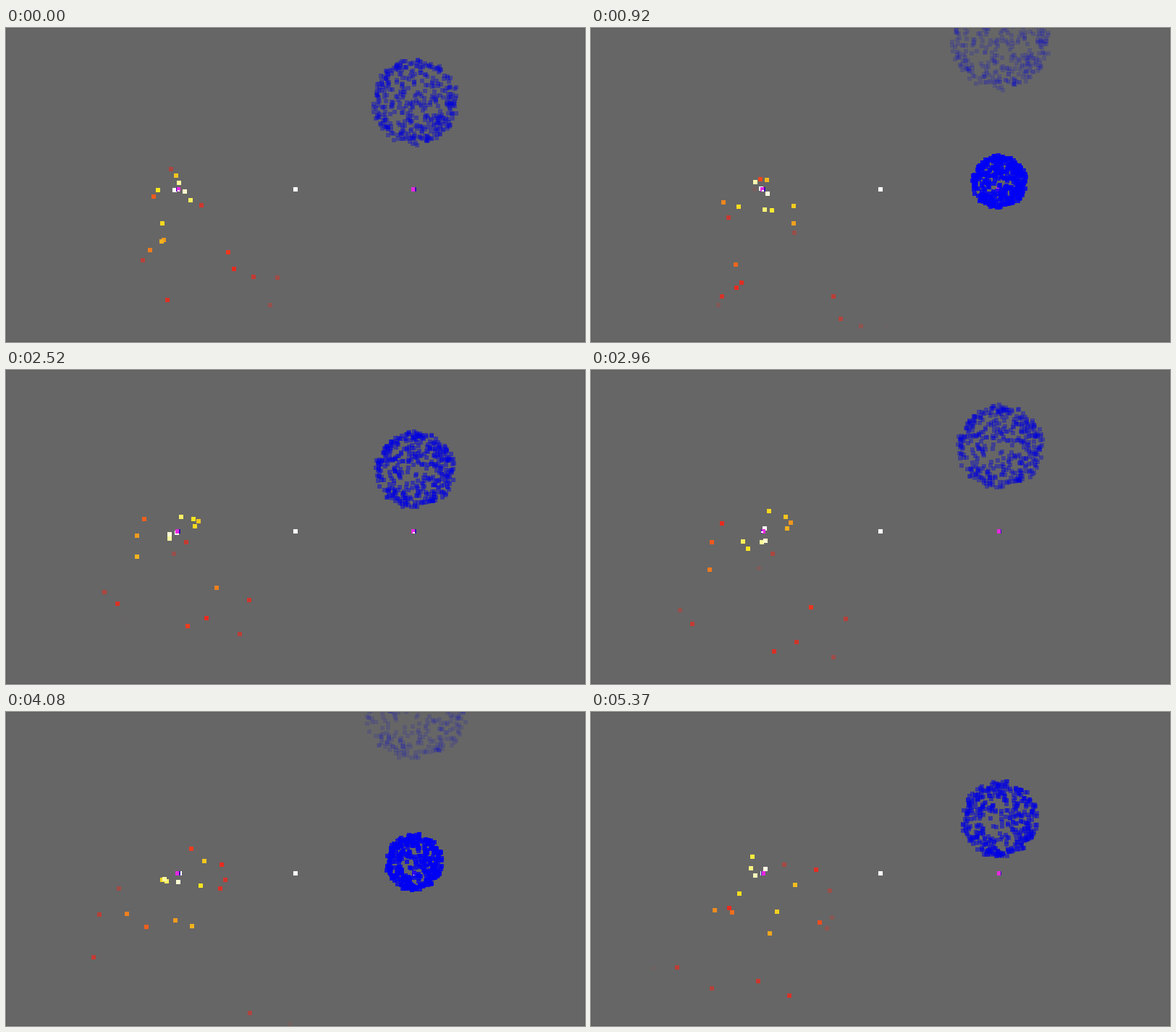
Recreate the animation shown at these times as an HTML page with a canvas. Size 800 by 434 pixels, loop 5.44 s.

```html
<!DOCTYPE html>
<html lang="en">
<head>
<meta charset="utf-8">
<title>Particle emitters</title>
<style>
  html, body { margin: 0; width: 100%; height: 100%; overflow: hidden; background: #666; }
  canvas { display: block; width: 800px; height: 434px; }
</style>
</head>
<body>
<canvas id="stage" width="800" height="434"></canvas>
<script>
const ctx = document.getElementById('stage').getContext('2d');
const LOOP = 5440, STEP = 47.26, LEAD = 10;
const SIZE = 6;

// Times in seconds, distances in pixels
const FIRE = { x: 236.5, y: 222.5, speed: 40, gravity: 18, life: 4.6, fade: 2.2, every: 0.195 };
const BALL = {
  x: 563.3, y: 222.7, drift: 0.7, lift: 14.05, radius: 28.6, growth: 10.9,
  life: 4.6, first: -2.93, every: 2.99, count: 400
};

function random(seed) {
  return () => {
    seed = (seed + 0x6D2B79F5) | 0;
    let n = Math.imul(seed ^ (seed >>> 15), 1 | seed);
    n = (n + Math.imul(n ^ (n >>> 7), 61 | n)) ^ n;
    return ((n ^ (n >>> 14)) >>> 0) / 4294967296;
  };
}

// A random direction on a unit sphere, seen from the front
function direction(rnd) {
  const z = rnd() * 2 - 1, turn = rnd() * Math.PI * 2;
  const r = Math.sqrt(1 - z * z);
  return [r * Math.cos(turn), r * Math.sin(turn)];
}

function makeBurst(i) {
  const rnd = random(11 + i * 7);
  const dots = Array.from({ length: BALL.count }, () => {
    const depth = 0.84 + rnd() * 0.16;
    return direction(rnd).map(v => v * depth);
  });
  return { birth: BALL.first + i * BALL.every, dots };
}

function makeSparks() {
  const rnd = random(29);
  const births = [];
  for (let t = -FIRE.life; t < LOOP / 1000; t += FIRE.every) births.push(t);
  return births.map(birth => {
    const [vx, vy] = direction(rnd).map(v => v * FIRE.speed);
    return { birth, vx, vy };
  });
}

const bursts = [0, 1, 2].map(makeBurst);
const sparks = makeSparks();

function square(x, y) {
  ctx.fillRect(Math.round(x - SIZE / 2), Math.round(y - SIZE / 2), SIZE, SIZE);
}

// White cools through yellow and orange to red
function heatColor(age) {
  const red = 255 - 9 * Math.min(age, 2.5);
  const green = Math.max(42, 255 - 207 * Math.pow(age / 2.3, 2.2));
  const blue = Math.max(30, 255 * (1 - Math.pow(age / 0.95, 1.5)));
  return `rgb(${[red, green, blue].map(Math.round)})`;
}

function drawBurst({ birth, dots }, t) {
  const age = t - birth;
  if (age < 0 || age >= BALL.life) return;
  const cx = BALL.x + BALL.drift * age;
  const cy = BALL.y - BALL.lift * age * age;
  const r = BALL.radius + BALL.growth * age;
  ctx.globalAlpha = 1 - age / BALL.life;
  ctx.fillStyle = `rgb(0,0,${Math.round(255 - 12 * age)})`;
  for (const [x, y] of dots) square(cx + x * r, cy + y * r);
  ctx.globalAlpha = 1;
}

function drawSpark({ birth, vx, vy }, t) {
  const age = t - birth;
  if (age < 0 || age >= FIRE.life) return;
  ctx.globalAlpha = Math.min(1, (FIRE.life - age) / FIRE.fade);
  ctx.fillStyle = heatColor(age);
  square(FIRE.x + vx * age, FIRE.y + vy * age + FIRE.gravity / 2 * age * age);
  ctx.globalAlpha = 1;
}

// Flickering core of an emitter
function drawCore(x, y, seed) {
  const rnd = random(seed);
  ctx.fillStyle = '#3414b4';
  square(x + 1, y);
  ctx.fillStyle = '#e828e0';
  ctx.fillRect(x - 3 + Math.floor(rnd() * 3), y - 3, 5, 6);
  if (rnd() < 0.5) {
    ctx.fillStyle = '#fff';
    ctx.fillRect(x - 2 + Math.floor(rnd() * 3), y + Math.floor(rnd() * 2), 3, 2);
  }
}

function draw() {
  const step = Math.floor((performance.now() % LOOP - LEAD) / STEP);
  const t = Math.max(0, LEAD + step * STEP) / 1000;
  ctx.fillStyle = '#666';
  ctx.fillRect(0, 0, 800, 434);
  ctx.strokeStyle = '#5d5d5d';
  ctx.strokeRect(0.5, 0.5, 799, 433);
  ctx.fillStyle = '#fff';
  square(400, 223);
  drawCore(563, 223, step + 5000);
  bursts.forEach(burst => drawBurst(burst, t));
  sparks.forEach(spark => drawSpark(spark, t));
  drawCore(237, 223, step);
  requestAnimationFrame(draw);
}
draw();
</script>
</body>
</html>
```
